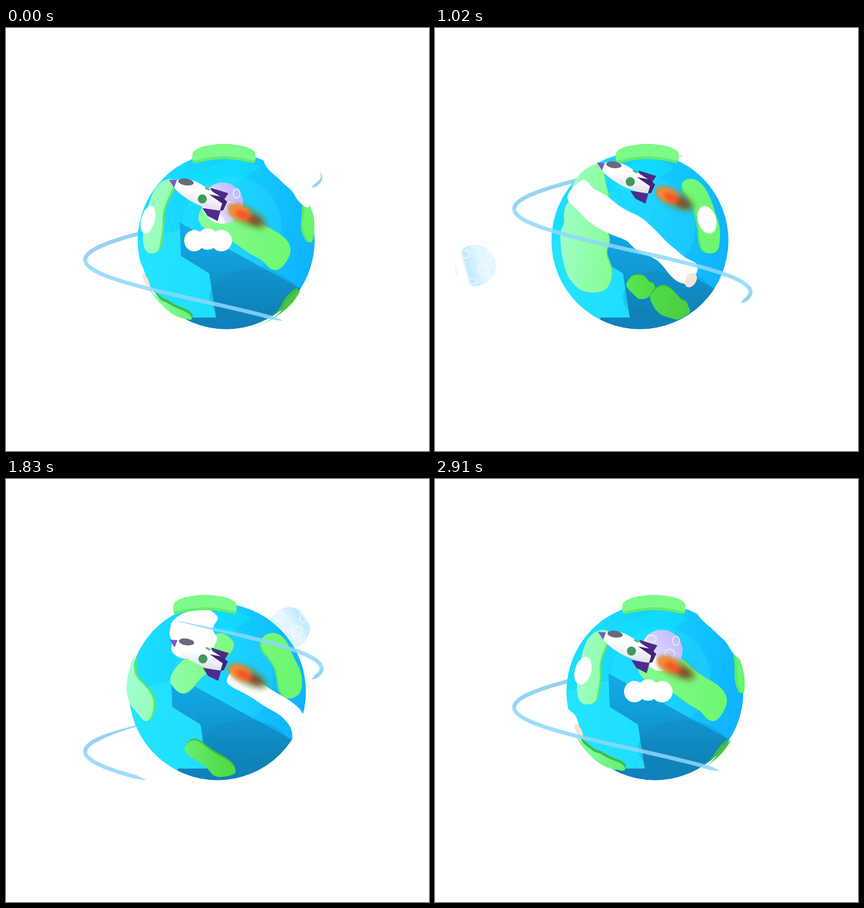
An HTML page for the animation above (2940 ms loop, 748 px wide and 748 px high).

```html
<!DOCTYPE html>
<html lang="en">
<head>
<meta charset="utf-8">
<title>Rocket over a spinning globe</title>
<style>
html, body { margin: 0; width: 100%; height: 100%; overflow: hidden; background: #fff; }
svg { display: block; width: 100vw; height: 100vh; }
</style>
</head>
<body>
<svg viewBox="0 0 748 748">
  <defs>
    <linearGradient id="water" x1="0" y1=".35" x2="1" y2=".5">
      <stop offset="0" stop-color="#1cdfff"/>
      <stop offset=".5" stop-color="#12cfff"/>
      <stop offset="1" stop-color="#10b2ff"/>
    </linearGradient>
    <linearGradient id="shade" x1="0" y1="0" x2="0" y2="1">
      <stop offset="0" stop-color="#10aeea"/>
      <stop offset=".45" stop-color="#1199d4"/>
      <stop offset=".8" stop-color="#1084ba"/>
      <stop offset="1" stop-color="#107fbc"/>
    </linearGradient>
    <linearGradient id="land" gradientUnits="userSpaceOnUse" x1="-155" y1="0" x2="155" y2="30">
      <stop offset="0" stop-color="#a0ffcc"/>
      <stop offset=".3" stop-color="#8bfc9c"/>
      <stop offset=".5" stop-color="#80fb86"/>
      <stop offset="1" stop-color="#68f56c"/>
    </linearGradient>
    <linearGradient id="lowland" gradientUnits="userSpaceOnUse" x1="-110" y1="0" x2="110" y2="0">
      <stop offset="0" stop-color="#7cfb98"/>
      <stop offset=".5" stop-color="#52e04a"/>
      <stop offset="1" stop-color="#46c840"/>
    </linearGradient>
    <linearGradient id="moonFill" gradientUnits="userSpaceOnUse" y1="0" y2="0">
      <stop offset=".2" stop-color="#e4f6ff"/>
      <stop offset=".36" stop-color="#bfe8ff"/>
      <stop offset=".4" stop-color="#fff"/>
      <stop offset=".48" stop-color="#fff"/>
      <stop offset=".52" stop-color="#dcd6ff"/>
      <stop offset="1" stop-color="#b3adf8"/>
    </linearGradient>
    <linearGradient id="hull" x1=".6" y1="0" x2=".4" y2="1">
      <stop offset=".4" stop-color="#fff"/>
      <stop offset="1" stop-color="#dcd9e8"/>
    </linearGradient>
    <clipPath id="disc"><circle r="156.5"/></clipPath>
    <clipPath id="floor"><rect x="-260" y="-376" width="520" height="534"/></clipPath>
    <filter id="soft" x="-50%" y="-80%" width="200%" height="260%"><feGaussianBlur stdDeviation="5"/></filter>
    <filter id="softer" x="-50%" y="-80%" width="200%" height="260%"><feGaussianBlur stdDeviation="3"/></filter>
  </defs>

  <path id="trailBack" fill="#97d3f2"/>
  <g id="globe">
    <g clip-path="url(#disc)">
      <circle r="157" fill="url(#water)"/>
      <path d="M-160 0L-80-20-25 60-15 140-60 156-160 100Z" fill="#2cecff" opacity=".5"/>
      <path d="M-80-110L20-150 60-130-10-80Z" fill="#10e4ff" opacity=".5"/>
      <g fill="#4af2ff" opacity=".18">
        <circle cx="10" cy="-25" r="88"/><circle cx="10" cy="-25" r="62"/><circle cx="10" cy="-25" r="38"/>
      </g>
      <path d="M-82-32L160 100 120 160-70 160-70 136-18 136-30 58-80 27Z" fill="url(#shade)"/>
      <ellipse cx="50" cy="100" rx="80" ry="50" fill="#0f7fb4" opacity=".25"/>
    </g>
    <g id="surface" clip-path="url(#floor)"></g>
    <path id="capSide" fill="#62ec70"/>
    <path id="capTop" fill="#7dfb88"/>
  </g>
  <path id="trailFront" fill="#8fd8fb" opacity=".85"/>
  <g id="moon">
    <circle r="36.5" fill="url(#moonFill)"/>
    <g fill="none" stroke="#fff" stroke-width="1.5" opacity=".8">
      <ellipse cx="-19" cy="-20" rx="9" ry="7"/><ellipse cx="14" cy="7" rx="9" ry="9"/>
      <ellipse cx="25" cy="-17" rx="6" ry="8"/><ellipse cx="-6" cy="28" rx="8" ry="5"/>
    </g>
  </g>
  <g id="rocket">
    <g transform="translate(423 330) rotate(27)">
      <g filter="url(#soft)">
        <ellipse cx="5" rx="38" ry="16" fill="#7c8a35" opacity=".65"/>
        <ellipse cx="19" rx="15" ry="8" fill="#5d3a20" opacity=".7"/>
      </g>
      <g filter="url(#softer)">
        <ellipse cx="-11" rx="22" ry="13" fill="#f48a32"/>
        <ellipse cx="-2" cy="1" rx="16" ry="8" fill="#f2562a"/>
        <ellipse cx="16" cy="1" rx="9" ry="5" fill="#a04a28" opacity=".8"/>
      </g>
    </g>
    <path d="M361 281L393 291 385 303 367 294Z" fill="#4c2a86"/>
    <path d="M301 268C313 263 331 267 343 274L379 297 385 307 379 322C354 321 315 303 297 281Z" fill="url(#hull)"/>
    <path d="M359 293L381 297 391 306 384 321 378 322 382 309Z" fill="#42257a"/>
    <path d="M347 317L379 322 374 340 356 331Z" fill="#4f2c8c"/>
    <path d="M288 267L302 268 297 281Z" fill="#7b58cb"/>
    <ellipse cx="318" cy="271" rx="13.5" ry="6" transform="rotate(8 318 271)" fill="#69697f"/>
    <circle cx="347" cy="301" r="8" fill="#40995f"/>
    <ellipse cx="356" cy="283" rx="5" ry="1.8" transform="rotate(25 356 283)" fill="#62b57c"/>
  </g>
</svg>
<script>
const LOOP = 2940, SPIN = 1470, STEP = 30;
const TAU = 2 * Math.PI, RAD = Math.PI / 180;
const LAND = 161, CLOUD = 166;
const $ = id => document.getElementById(id);
const clamp = (v, lo, hi) => Math.min(hi, Math.max(lo, v));
const range = (n, f) => Array.from({ length: n }, (_, i) => f(i));
const fix = (x, y) => `${x.toFixed(1)} ${y.toFixed(1)}`;

const centre = t => 371 + 18.5 * Math.cos(TAU * (t - 30) / SPIN);
const spin = t => 360 * t / SPIN + 3 * Math.sin(Math.PI * t / LOOP) ** 2;

// Closed curve through the midpoints of the outline's edges
function smooth(pts) {
  const mid = (a, b) => fix((a[0] + b[0]) / 2, (a[1] + b[1]) / 2);
  return "M" + mid(pts.at(-1), pts[0]) + pts.map((p, i) =>
    `Q${fix(...p)} ${mid(p, pts[(i + 1) % pts.length])}`).join("") + "Z";
}

// Bumpy band around a spine of [longitude, latitude, half width] in degrees
function band(spine, bump) {
  const samples = [];
  spine.slice(1).forEach((q, i) => {
    const p = spine[i];
    for (let k = i ? 1 : 0; k <= 4; k++) samples.push(p.map((v, j) => v + (q[j] - v) * k / 4));
  });
  const left = [], right = [], last = samples.length - 1;
  samples.forEach(([lon, lat, w], i) => {
    const a = samples[Math.max(i - 1, 0)], b = samples[Math.min(i + 1, last)];
    const squeeze = Math.cos(lat * RAD);
    const dx = (b[0] - a[0]) * squeeze, dy = b[1] - a[1], len = Math.hypot(dx, dy);
    const at = (along, across) => [
      lon + (dx * along - dy * across) / len / squeeze,
      lat + (dy * along + dx * across) / len];
    const wl = w * (1 + bump * Math.sin(2.4 * i + lon)), wr = w * (1 + bump * Math.cos(2.1 * i + lat));
    const cap = along => { left.push(at(along, 0.6 * w)); right.unshift(at(along, -0.6 * w)); };
    if (i === 0) cap(-0.6 * w);
    left.push(at(0, wl));
    right.unshift(at(0, -wr));
    if (i === last) cap(0.6 * w);
  });
  return left.concat(right);
}

const disc = (lon, lat, r) => range(12, i => [lon + r * Math.cos(i * TAU / 12), lat + r * Math.sin(i * TAU / 12)]);

const layers = [];
function addShape(fill, r, outline) {
  const el = document.createElementNS("http://www.w3.org/2000/svg", "path");
  el.setAttribute("fill", fill);
  $("surface").append(el);
  const lons = outline.map(p => p[0]);
  const lo = Math.min(...lons), hi = Math.max(...lons);
  layers.push({ el, r, outline, mid: (lo + hi) / 2, half: (hi - lo) / 2 });
}
function land(...spine) {
  const south = spine[0][1] < -20, outline = band(spine, 0.13);
  addShape(south ? "#3fbd40" : "#5ce86a", LAND - 5, outline);
  addShape(south ? "url(#lowland)" : "url(#land)", LAND, outline);
}
const cloud = (...spine) => addShape("#fff", CLOUD, band(spine, 0.15));
const puff = (lon, lat, r, fill = "#fff") => addShape(fill, CLOUD, disc(lon, lat, r));

land([-12, 18, 9], [4, 12, 11], [38, -10, 10]);
land([-60, 36, 11], [-55, -2, 10]);
land([95, 34, 8], [66, 6, 9]);
land([70, -38, 7], [102, -64, 8]);
land([140, 32, 13], [148, 4, 13]);
land([188, 52, 9], [208, 32, 16], [212, 8, 19], [213, -24, 18]);
land([248, -28, 7], [257, -34, 7]);
land([268, -36, 8], [284, -48, 9], [310, -56, 5]);

cloud([66, 52, 15], [74, 30, 14]);
cloud([100, 8, 5], [150, -16, 6], [168, -27, 10], [178, -33, 6]);
cloud([198, 33, 9], [248, 7, 9], [265, -7, 6], [286, -21, 8]);
puff(289, -25, 5, "#f1e6d6");
puff(300, 13, 9);
for (let i = 0; i < 3; i++) puff(-20 + 8.5 * i, i % 2, 6.8);

function project({ outline, mid, half, r }, t) {
  const gap = mid - spin(t), turn = gap - 360 * Math.round(gap / 360);
  if (Math.abs(turn) - half > 90) return "";
  return smooth(outline.map(([lon, lat]) => {
    const east = clamp(turn + lon - mid, -90, 90) * RAD;
    return [r * Math.cos(lat * RAD) * Math.sin(east), -r * Math.sin(lat * RAD)];
  }));
}

function polarCap(slide, thick) {
  const soft = v => Math.sign(v) * Math.abs(v) ** 0.4;
  return smooth(range(28, i => {
    const x = soft(Math.cos(i * TAU / 28)), y = soft(Math.sin(i * TAU / 28));
    return [slide + 56 * x, -172 + 12 * x * x + thick * (1 + y) / 2];
  }));
}

// One stretch of the downward spiral; it tapers towards its ends a and b
function ribbon(h, from, to, a, b) {
  if (to - from < 0.02) return "";
  const left = [], right = [], dy = 147 / Math.PI;
  for (let i = 0; i <= 40; i++) {
    const q = from + (to - from) * i / 40;
    const x = 349 - 209 * Math.cos(q), y = h + dy * q;
    const dx = 209 * Math.sin(q);
    const w = 3.5 * clamp(Math.min((q - a) / 0.7, (b - q) / 0.12) + 0.15, 0, 1) / Math.hypot(dx, dy);
    left.push(fix(x - dy * w, y + dx * w));
    right.unshift(fix(x + dy * w, y - dx * w));
  }
  return "M" + left.concat(right).join("L") + "Z";
}

function drawTrail(t) {
  let back = "", front = "";
  const top = 116 + 0.2 * (t % SPIN);
  for (const h of [top, top + 294]) {
    const below = h - 248;
    const a = Math.max(-below * (below < 0 ? 0.0225 : 0.028), (h - 542) * 0.018);
    const b = Math.min(3.55, 2.3 - (h - 410) * 0.0172);
    front += ribbon(h, Math.max(a, 0), Math.min(b, Math.PI), a, b);
    back += ribbon(h, a, Math.min(b, 0), a, b) + ribbon(h, Math.max(a, Math.PI), b, a, b);
  }
  $("trailBack").setAttribute("d", back);
  $("trailFront").setAttribute("d", front);
}

function drawMoon(t) {
  const q = TAU * (t - 2282) / LOOP, c = Math.cos(q), s = Math.sin(q);
  const moon = $("moon"), fill = $("moonFill");
  moon.setAttribute("transform", `translate(${335 + 292 * c} ${325 - 106 * c + 2 * s})`);
  if (s > 0) $("rocket").before(moon); else $("globe").before(moon);
  const edge = 36.5 * (0.55 - s);
  fill.setAttribute("x1", edge - 75);
  fill.setAttribute("x2", edge + 75);
  fill.setAttribute("gradientTransform", `rotate(${c < 0 ? 165 : -35})`);
}

function draw(t) {
  $("globe").setAttribute("transform", `translate(${centre(t)} 376)`);
  for (const layer of layers) layer.el.setAttribute("d", project(layer, t));
  const slide = -4 - 18 * Math.sin(TAU * t / SPIN);
  $("capSide").setAttribute("d", polarCap(slide, 27));
  $("capTop").setAttribute("d", polarCap(slide, 22));
  drawTrail(t);
  drawMoon(t);
  const bob = Math.sin(TAU * (t - 50) / LOOP);
  $("rocket").setAttribute("transform", `translate(${-2 * bob} ${-2 - 31 * bob})`);
}

const start = performance.now();
function tick() {
  const t = (performance.now() - start) % LOOP;
  draw(Math.floor(t / STEP) * STEP);
  requestAnimationFrame(tick);
}
tick();
</script>
</body>
</html>
```
